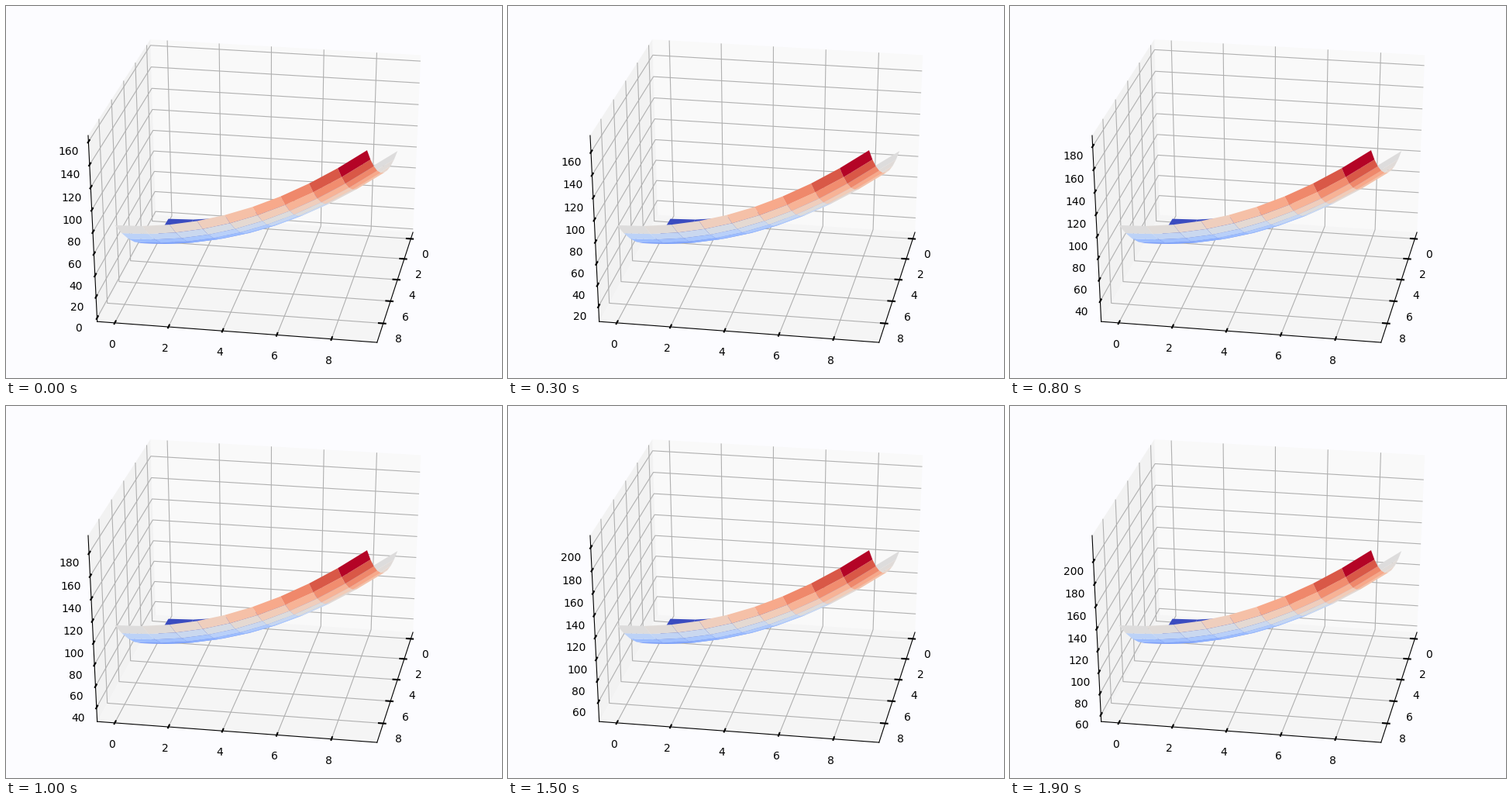
Write a matplotlib script that moves like this. It is 640x480 px and loops after 2 s.

```python
import numpy as np
import matplotlib.pyplot as plt
from matplotlib.animation import FuncAnimation
from matplotlib.collections import LineCollection, PolyCollection

W, H, DPI = 640, 480, 100
FRAMES, INTERVAL = 20, 100
STEP = 3                       # rise of the surface per frame
ELEV, AZIM, DIST = np.radians(30), np.radians(10), 10
PX = 0.45 / 0.99               # half the data span after a 5 % margin
BOX = 0.5 + 1 / 48             # half side of the drawn box
DELTA = 1 / 12
LABEL = BOX + 11.5 * 48 / 806.4 * DELTA
TICK_IN, TICK_OUT = BOX - 0.2 * DELTA, BOX + 0.1 * DELTA
GRID = "#b0b0b0"

ce, se, ca, sa = np.cos(ELEV), np.sin(ELEV), np.cos(AZIM), np.sin(AZIM)
RIGHT = np.array([-sa, ca, 0])
UP = np.array([-se * ca, -se * sa, ce])
TOWARD = np.array([ce * ca, ce * sa, se])


def project(points):
    """Unit-cube points, centred on zero, to pixels from bottom left."""
    p = np.asarray(points, float)
    depth = DIST - p @ TOWARD
    x = (0.095 + p @ RIGHT / depth) / 0.185 * W
    y = (0.095 + p @ UP / depth) / 0.185 * H
    return np.stack([x, y], axis=-1)


def unit(v):
    return (v - 4.5) / 9 * 2 * PX


fig = plt.figure(figsize=(W / DPI, H / DPI), dpi=DPI,
                 facecolor=(252 / 255, 252 / 255, 1))
ax = fig.add_axes([0, 0, 1, 1])
ax.set_xlim(0, W)
ax.set_ylim(0, H)
ax.axis("off")


def lines(segs, color, z, width=0.8, cap="butt"):
    art = LineCollection(segs, colors=[color], linewidths=width,
                         capstyle=cap, zorder=z)
    ax.add_collection(art)
    return art


def label(text):
    return ax.text(0, 0, text, ha="center", va="top", fontsize=10,
                   family="DejaVu Sans", color="black", zorder=5)


# Panes: back wall, left wall, floor
m = BOX
panes = [
    ([(-m, -m, -m), (-m, m, -m), (-m, m, m), (-m, -m, m)], 0.975),
    ([(-m, -m, -m), (m, -m, -m), (m, -m, m), (-m, -m, m)], 0.95),
    ([(-m, -m, -m), (m, -m, -m), (m, m, -m), (-m, m, -m)], 0.9625),
]
for corners, grey in panes:
    ax.add_collection(PolyCollection([project(corners)], linewidths=0,
                                     facecolors=[str(grey)], zorder=1))

# Horizontal axes with their grids and ticks
grid, ticks = [], []
for v in range(0, 10, 2):
    u = unit(v)
    grid.append(project([(u, m, -m), (u, -m, -m), (u, -m, m)]))
    grid.append(project([(m, u, -m), (-m, u, -m), (-m, u, m)]))
    ticks.append(project([(u, TICK_IN, -m), (u, TICK_OUT, -m)]))
    ticks.append(project([(TICK_IN, u, -m), (TICK_OUT, u, -m)]))
    label(str(v)).set_position(project((u, LABEL, -LABEL)))
    label(str(v)).set_position(project((LABEL, u, -LABEL)))
lines(grid, GRID, 2)
lines(ticks, "black", 3, 1.5, "projecting")
lines([project([(-m, m, -m), (m, m, -m)]),
       project([(m, -m, -m), (m, m, -m)]),
       project([(m, -m, -m), (m, -m, m)])], "black", 3, cap="projecting")

# Surface z = x^2 + y^2, far cells first
cells = []
for i in range(9):
    for j in range(9):
        xy = [(i, j), (i + 1, j), (i + 1, j + 1), (i, j + 1)]
        quad = np.array([(unit(x), unit(y), (x * x + y * y) / 162 - 0.5)
                         for x, y in xy])
        mean = np.mean([x * x + y * y for x, y in xy])
        cells.append((np.mean(quad @ TOWARD), quad, (mean - 1) / 144))
cells.sort(key=lambda c: c[0])
cmap = plt.get_cmap("coolwarm")
ax.add_collection(PolyCollection(
    [project(q) for _, q, _ in cells],
    facecolors=[cmap(c) for _, _, c in cells],
    linewidths=0, zorder=4))

# Vertical axis, scrolling with the rising limits
z_grid = lines([], GRID, 2)
z_ticks = lines([], "black", 3, 1.5, "projecting")
z_labels = [label("") for _ in range(9)]


def update(k):
    low = STEP * k
    values = [v for v in range(0, 240, 20) if low <= v <= low + 162]
    heights = [(v - low) / 162 - 0.5 for v in values]
    z_grid.set_segments([project([(m, -m, z), (-m, -m, z), (-m, m, z)])
                         for z in heights])
    z_ticks.set_segments([project([(TICK_IN, -m, z), (TICK_OUT, -m, z)])
                          for z in heights])
    for text in z_labels:
        text.set_text("")
    for text, v, z in zip(z_labels, values, heights):
        text.set_text(str(v))
        text.set_position(project((LABEL, -LABEL, z)))
    return [z_grid, z_ticks, *z_labels]


anim = FuncAnimation(fig, update, frames=FRAMES, interval=INTERVAL,
                     init_func=lambda: update(0), repeat=True, blit=False)
plt.show()
```
